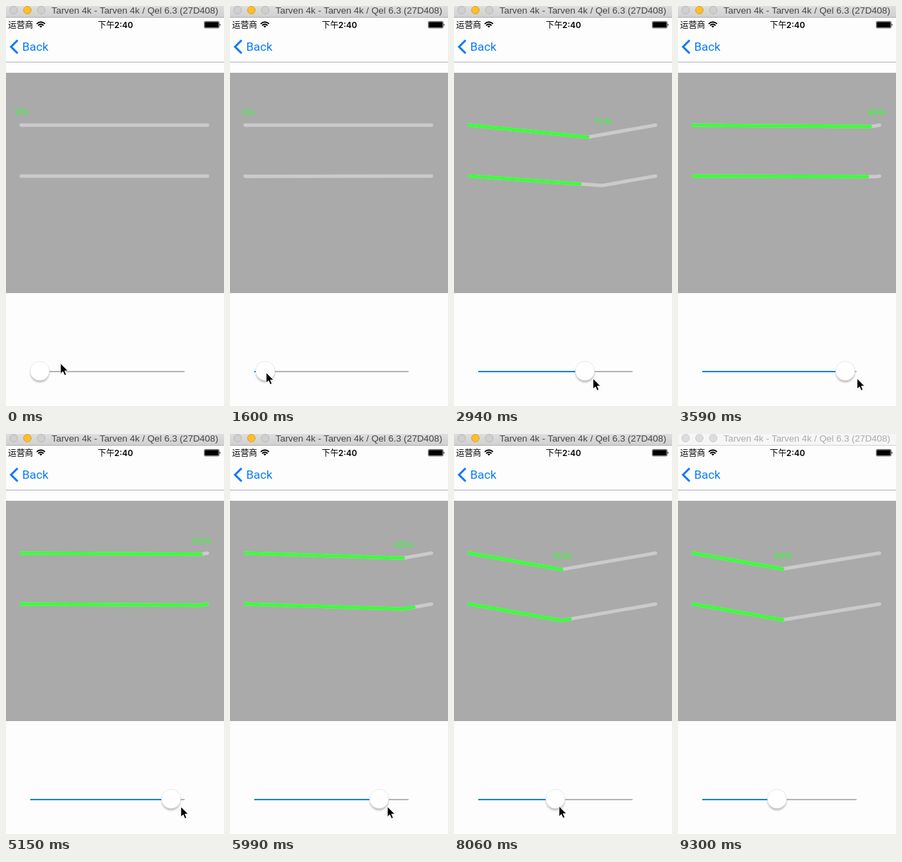
Write an HTML page that moves like this. It is 316 px wide and 581 px high and loops after 9.4 s.

```html
<!DOCTYPE html>
<html lang="zh">
<head>
<meta charset="utf-8">
<title>Bending progress bars</title>
<style>
  html, body { margin: 0; width: 100%; height: 100%; overflow: hidden; background: #fdfdfd; }
  svg { display: block; }
  text { white-space: pre; }
  .title { font: 13.4px "Liberation Sans", Arial, sans-serif; }
  .status { font: 12.2px "Noto Sans CJK SC", "Noto Sans CJK", sans-serif; }
  .clock { font-weight: 500; }
  .digits { font: 600 12px Inter, sans-serif; }
  .back { font: 17.3px Roboto, sans-serif; fill: #087aff; }
  .label { font: 13.5px "Liberation Sans", Arial, sans-serif; fill: #3f3; text-anchor: middle; }
  .bar { fill: none; stroke-width: 5; stroke-linecap: round; stroke-linejoin: round; }
  .rest { stroke: #cbcbcb; }
  .done { stroke: #3cff3c; }
  #window { --strip: url(#chrome); --edge: #b1b1b1; --dot: #d0d0d0; --rim: #b8b8b8; --mid: #ffbd2e; --midrim: #dfa023; --ink: #464646; }
  #window.idle { --strip: #f6f6f6; --edge: #d4d4d4; --dot: #dcdcdc; --rim: #ccc; --mid: #dcdcdc; --midrim: #ccc; --ink: #aaa; }
  .strip { fill: var(--strip); }
  .edge { fill: var(--edge); }
  .dot { fill: var(--dot); stroke: var(--rim); }
  .mid { fill: var(--mid); stroke: var(--midrim); }
  .title { fill: var(--ink); }
</style>
</head>
<body>
<svg width="316" height="581" viewBox="0 0 316 581">
  <defs>
    <linearGradient id="chrome" x2="0" y2="1">
      <stop offset="0" stop-color="#dedede"/><stop offset="1" stop-color="#d0d0d0"/>
    </linearGradient>
    <filter id="blur" x="-40%" y="-40%" width="180%" height="180%">
      <feGaussianBlur stdDeviation="1.7"/>
    </filter>
  </defs>
  <rect width="316" height="581" fill="#fdfdfd"/>

  <g id="window">
    <rect class="strip" width="316" height="16"/>
    <rect class="edge" y="16" width="316" height="1"/>
    <circle class="dot" cx="11" cy="6" r="5.5"/>
    <circle class="mid" cx="31" cy="6" r="5.5"/>
    <circle class="dot" cx="51" cy="6" r="5.5"/>
    <text class="title" x="66" y="11">Tarven 4k - Tarven 4k / Qel 6.3 (27D408)</text>
  </g>

  <text class="status" x="3" y="31.5">运营商</text>
  <g fill="none" stroke="#000" stroke-width="1.9">
    <path d="M44.5 25.9Q50.5 20.5 56.5 25.9M46.6 28.2Q50.5 24.8 54.4 28.2"/>
    <path d="M50.5 31.6L48.4 29.3Q50.5 27.8 52.6 29.3Z" fill="#000" stroke="none"/>
  </g>
  <text class="status clock" x="133" y="31.5">下午</text>
  <text class="digits" x="157" y="31.5">2:40</text>
  <rect x="287.4" y="22.4" width="21.6" height="9.6" rx="1.5" fill="none" stroke="#222" stroke-width=".7"/>
  <rect x="288.2" y="23.2" width="20" height="8" rx=".7"/>
  <path d="M309.6 25.4Q312 27.2 309.6 29Z"/>

  <path d="M16.8 49.7L7.3 59.2L16.8 68.7" fill="none" stroke="#087aff" stroke-width="3"/>
  <text class="back" x="23.5" y="65">Back</text>
  <rect y="81" width="316" height="1" fill="#b2b2b2"/>

  <rect y="97" width="316" height="320" fill="#aaa"/>
  <path id="rest1" class="bar rest"/><path id="done1" class="bar done"/>
  <path id="rest2" class="bar rest"/><path id="done2" class="bar done"/>
  <text id="label" class="label"></text>

  <rect x="35" y="530" width="224" height="2" rx="1" fill="#b5b5b5"/>
  <rect id="fill" x="35" y="530" height="2" rx="1" fill="#087aff"/>
  <g id="thumb">
    <circle cy="3" r="13.5" fill="#000" opacity=".27" filter="url(#blur)"/>
    <circle r="14" fill="#fff" stroke="#d2d2d2" stroke-width=".5"/>
  </g>
  <path id="cursor" d="M0 0V15.4L3.5 12.1L5.9 17.6L8.6 16.4L6.2 11.1H11Z" fill="#000" stroke="#fff" stroke-width="1"/>
</svg>
<script>
const LOOP = 9400, INACTIVE = 9300;
const LEFT = 22, SPAN = 270, DEPTH = 48;
const LAG_BEND = 150, LAG_FILL = 230;

const linear = u => u;
const sine = u => (1 - Math.cos(Math.PI * u)) / 2;
const ramp = (t, start, end) => Math.min(1, Math.max(0, (t - start) / (end - start)));

// Slider drags: final value, and final gap between thumb and pointer
const DRAGS = [
  { start: 1580, end: 3360, value: .935, gap: 15, ease: linear },
  { start: 3360, end: 3680, value: 1, gap: 18, ease: linear },
  { start: 3680, end: 4450, value: 1, gap: 13, ease: sine },
  { start: 4900, end: 5510, value: .905, gap: 16, ease: sine },
  { start: 5790, end: 6120, value: .82, gap: 10, ease: sine },
  { start: 6630, end: 8300, value: .48, gap: 5, ease: sine }
];

function slider(t) {
  const s = { value: 0, gap: 1 };
  for (const d of DRAGS) {
    const u = d.ease(ramp(t, d.start, d.end));
    s.value += (d.value - s.value) * u;
    s.gap += (d.gap - s.gap) * u;
  }
  return s;
}

const px = v => LEFT + SPAN * v;
const sag = v => DEPTH * Math.min(v, 1 - v);
const thumbX = v => 49 + 197 * v;

function set(id, attrs) {
  const el = document.getElementById(id);
  for (const k in attrs) el.setAttribute(k, attrs[k]);
}

function drawBar(n, y, bend, done) {
  const start = `M${LEFT} ${y}`;
  const corner = `L${px(bend)} ${y + sag(bend)}`;
  set('rest' + n, { d: `${start}${corner}L${LEFT + SPAN} ${y}` });

  let d = '';
  if (done > .002) {
    const past = done > bend;
    const side = past ? (1 - done) / (1 - bend) : done / bend;
    d = `${start}${past ? corner : ''}L${px(done)} ${y + sag(bend) * side}`;
  }
  set('done' + n, { d });
}

function drawPointer(t, { value, gap }) {
  const away = 1 - sine(ramp(t, 0, 380));
  const exit = ramp(t, 8520, 8600);
  const x = thumbX(value) + gap + 29 * away + 90 * exit;
  const y = 532 + Math.min(9, 17 * value) - 13 * away + 50 * exit;
  set('cursor', { transform: `translate(${x} ${y})` });
}

function draw(t) {
  const now = slider(t), v = now.value;
  const bend = Math.min(v, slider(t - LAG_BEND).value);
  drawBar(1, 173, bend, bend);
  drawBar(2, 247, v, slider(t - LAG_FILL).value);

  document.getElementById('label').textContent = Math.round(v * 100) + '%';
  set('label', { x: px(v) + 1, y: 158 + sag(v) });

  set('fill', { width: thumbX(v) - 35 });
  set('thumb', { transform: `translate(${thumbX(v)} 530)` });
  drawPointer(t, now);
  set('window', { class: t < INACTIVE ? '' : 'idle' });
}

const begin = performance.now();
function tick() {
  draw((performance.now() - begin) % LOOP);
  requestAnimationFrame(tick);
}
tick();
</script>
</body>
</html>
```
